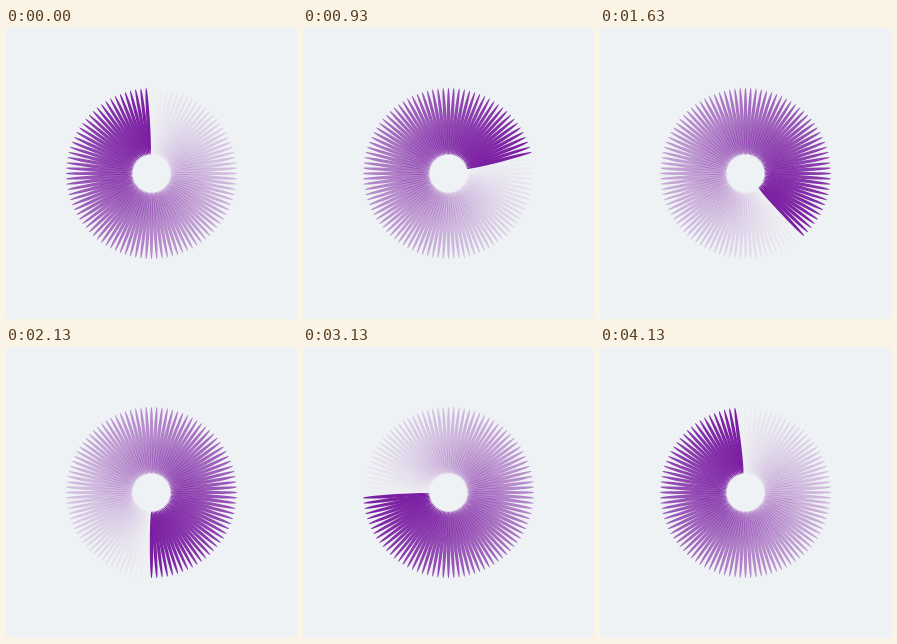
Recreate the animation shown at these times as an HTML page with a canvas. Size 291 by 291 pixels, loop 4.17 s.

```html
<!DOCTYPE html>
<html lang="en">
<head>
<meta charset="utf-8">
<title>Petal spinner</title>
<style>
  html, body { margin: 0; width: 100%; height: 100%; overflow: hidden; background: #eff2f4; }
  canvas { display: block; }
</style>
</head>
<body>
<canvas width="291" height="291"></canvas>
<script>
const ctx = document.querySelector('canvas').getContext('2d');
const SIZE = 291, LOOP = 4170, PETALS = 100;
const TICK = 1000 / 30;
const start = performance.now();

// The head advances 24 petals a second, seen on a 30 Hz clock.
function headStep(time) {
  const tick = Math.floor((time + 4) / TICK);
  return Math.floor(tick * 0.7999 + 0.009);
}

function drawPetal(index, alpha) {
  ctx.save();
  ctx.translate(SIZE / 2, SIZE / 2);
  ctx.rotate(index / PETALS * 2 * Math.PI);
  ctx.globalAlpha = alpha;
  ctx.beginPath();
  ctx.ellipse(0, -52.3, 1.7, 33.5, 0, 0, 2 * Math.PI);
  ctx.fill();
  ctx.restore();
}

function draw() {
  const step = headStep((performance.now() - start) % LOOP);
  ctx.clearRect(0, 0, SIZE, SIZE);
  ctx.fillStyle = '#7b1fa2';
  for (let i = 0; i < PETALS; i++) {
    const age = (step - 1 - i + PETALS) % PETALS;
    drawPetal(i, 1 - age / PETALS);
  }
  requestAnimationFrame(draw);
}
draw();
</script>
</body>
</html>
```
